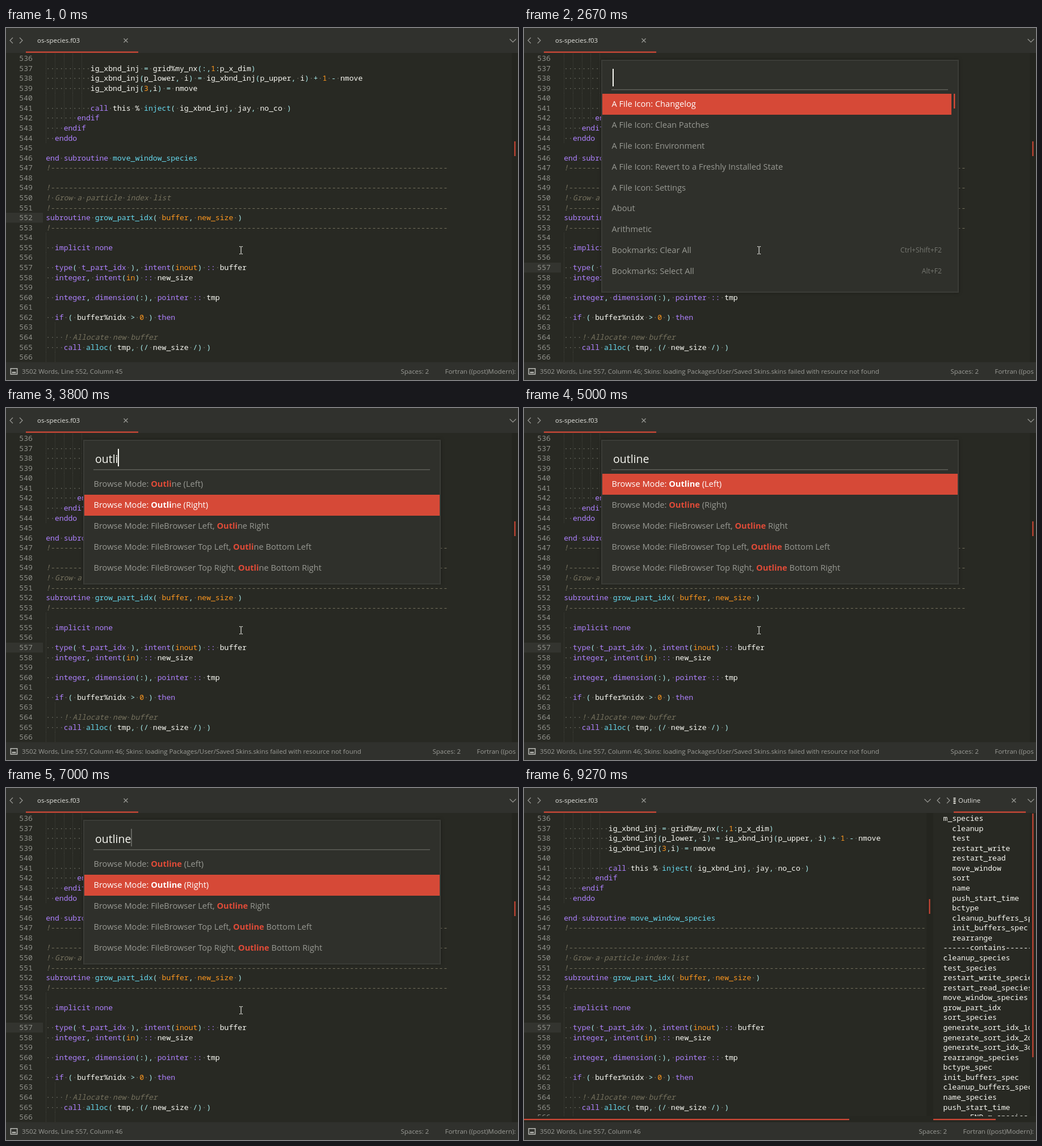
An HTML page with a canvas that plays this animation: 902 px wide and 621 px high, repeating every 9.39 s.

```html
<!DOCTYPE html>
<html lang="en">
<head>
<meta charset="utf-8">
<title>Outline command</title>
<style>
html, body { margin: 0; width: 100%; height: 100%; overflow: hidden; background: #282923; }
canvas { display: block; }
</style>
</head>
<body>
<canvas id="stage" width="902" height="621"></canvas>
<script>
const g = document.getElementById('stage').getContext('2d');
const LOOP = 9390, ADV = 7.86, CODE_X = 70.2, RED = '#d64937';
const MONO = '13.1px "Noto Sans Mono", "DejaVu Sans Mono", monospace';
const UI = '"Open Sans", "Noto Sans", sans-serif';
const SMALL = '11.45px ' + UI, ITEM = '14.6px ' + UI, QUERY = '19.5px ' + UI, HINT = '12.2px ' + UI;
const PURPLE = '#ae81ff', CYAN = '#66d9ef', ORANGE = '#fd971f', WHITE = '#f8f8f2', PUNCT = '#a6e8e8', COMMENT = '#75715e';

const RULE = '!' + '-'.repeat(89);
const CODE = `
          ig_xbnd_inj = grid%my_nx(:,1:p_x_dim)
          ig_xbnd_inj(p_lower, i) = ig_xbnd_inj(p_upper, i) + 1 - nmove
          ig_xbnd_inj(3,i) = nmove

          call this % inject( ig_xbnd_inj, jay, no_co )
       endif
    endif
  enddo

end subroutine move_window_species
${RULE}

${RULE}
! Grow a particle index list
${RULE}
subroutine grow_part_idx( buffer, new_size )
${RULE}

  implicit none

  type( t_part_idx ), intent(inout) :: buffer
  integer, intent(in) :: new_size

  integer, dimension(:), pointer :: tmp

  if ( buffer%nidx > 0 ) then

    ! Allocate new buffer
    call alloc( tmp, (/ new_size /) )
`.split('\n');
const KEYWORD = /^(call|endif|enddo|end|subroutine|implicit|none|type|t_part_idx|integer|intent|dimension|pointer|if|then|::)$/;
const FUNC = /^(inject|alloc|move_window_species|grow_part_idx)$/;

const OUTLINE = ['m_species',
  ...'cleanup test restart_write restart_read move_window sort name push_start_time bctype cleanup_buffers_spec init_buffers_spec rearrange'.split(' ').map(s => '  ' + s),
  '------contains------',
  ...'cleanup_species test_species restart_write_species restart_read_species move_window_species grow_part_idx sort_species generate_sort_idx_1d generate_sort_idx_2d generate_sort_idx_3d rearrange_species bctype_spec init_buffers_spec cleanup_buffers_spec name_species push_start_time'.split(' '),
  '------END m_species------'];

const ICONS = ['Changelog', 'Clean Patches', 'Environment', 'Revert to a Freshly Installed State', 'Settings'].map(s => 'A File Icon: ' + s);
const MARKS = ['Bookmarks: Clear All', 'Bookmarks: Select All'];
const BROWSE = ['Outline (Left)', 'Outline (Right)', 'FileBrowser Left, Outline Right',
  'FileBrowser Top Left, Outline Bottom Left', 'FileBrowser Top Right, Outline Bottom Right'].map(s => 'Browse Mode: ' + s);
const UNFOLD = 'Code Folding: Unfold All', LEVEL = 'Code Folding: Unfold To Level', UPPER = 'Convert Case: Upper Case';
const KEYS = { [MARKS[0]]: 'Ctrl+Shift+F2', [MARKS[1]]: 'Alt+F2', [UNFOLD]: 'Ctrl+K, Ctrl+J', [UPPER]: 'Ctrl+K, Ctrl+U' };

// start time, query, rows, selected row, scroll thumb length
const STATES = [
  [1330, '', [...ICONS, 'About', 'Arithmetic', ...MARKS], 0, 26],
  [2730, 'o', ['About', ...MARKS, ...BROWSE, UNFOLD], 4, 30],
  [3000, 'ou', [...BROWSE, UNFOLD, UPPER, 'File: Copy URL', 'Package Control: Upgrade Package'], 1, 95],
  [3270, 'out', [...BROWSE, LEVEL, 'Convert Case: Underscore to Title', 'Project: Quick Switch Project', 'Code Folding: Unfold Tags'], 1, 250],
  [3600, 'outl', [...BROWSE, LEVEL], 1, 0],
  [3800, 'outli', BROWSE, 1, 0],
  [4000, 'outlin', BROWSE, 0, 0],
  [4330, 'outline', BROWSE, 0, 0],
  [5870, 'outline', BROWSE, 1, 0]
];
const PALETTE_START = 1330, PALETTE_END = 7070;

// caret fades: start, target opacity, duration
const FADES = [[0, 0, 0], [330, 1, 1], [730, 0, 340], [1330, 1, 1], [1530, 0, 340], [2270, 1, 300], [4670, 0, 330],
  [5270, 1, 270], [5730, 0, 270], [6330, 1, 270], [6800, 0, 270], [7330, 1, 270], [8070, 0, 270], [8470, 1, 270], [9040, 0, 230]];

const last = (list, t) => list.filter(e => e[0] <= t).pop();

function caretAlpha(t) {
  const [start, to, span] = last(FADES, t);
  const k = span ? Math.min(1, (t - start) / span) : 1;
  return to ? k : 1 - k;
}

function rect(x, y, w, h, color) {
  g.fillStyle = color;
  g.fillRect(x, y, w, h);
}

function caret(t, x, y, h) {
  g.globalAlpha = caretAlpha(t);
  rect(x, y, 2, h, WHITE);
  g.globalAlpha = 1;
}

function text(s, x, y, font, color, align = 'left') {
  g.font = font;
  g.fillStyle = color;
  g.textAlign = align;
  g.fillText(s, x, y);
  return g.measureText(s).width;
}

function line(...points) {
  g.strokeStyle = '#9a9b96';
  g.lineWidth = 1.2;
  g.beginPath();
  for (const [x, y] of points) g.lineTo(x, y);
  g.stroke();
}

function clip(x, y, w, h, draw) {
  g.save();
  g.beginPath();
  g.rect(x, y, w, h);
  g.clip();
  draw();
  g.restore();
}

const baseline = i => Math.round(58 + 17.57 * i);

// blank lines keep the guides of the block around them
const blankDepth = i => i < 5 ? 10 : i > 26 ? 4 : i > 17 ? 2 : 0;

function codeLine(s, i) {
  const y = baseline(i), comment = s.trim()[0] === '!', indent = s.search(/\S/);
  const depth = indent < 0 ? blankDepth(i) : indent;
  for (let c = 0; c < depth; c += 2)
    for (let d = 0; d < 17; d += 2) rect(Math.round(CODE_X + c * ADV), y - 13 + d, 1, 1, '#41423b');
  let inArgs = false;
  for (const m of s.matchAll(comment ? /\s|\S+/g : /\w+|::|\s|[^\w\s]/g)) {
    const w = m[0], x = CODE_X + m.index * ADV;
    if (w === ' ') {
      rect(x + 3.2, y - 5, 1.5, 1.5, '#6c6d62');
      continue;
    }
    if (w === '(' && s.startsWith('subroutine')) inArgs = true;
    const color = comment ? COMMENT : KEYWORD.test(w) ? PURPLE : FUNC.test(w) ? CYAN
      : /^(\d+|in|inout)$/.test(w) || inArgs && /\w/.test(w) ? ORANGE : /\w|%/.test(w) ? WHITE : PUNCT;
    text(w, x, y, (comment ? 'italic ' : '') + MONO, color);
  }
}

function editor(t, split) {
  const right = split ? 709 : 891, bottom = split ? 579 : 589;
  const [active, column] = t < 330 ? [16, 44] : [21, 45];
  clip(0, 44, right, bottom - 44, () => {
    rect(0, baseline(active) - 13, 65, 17.5, '#33342f');
    CODE.forEach((s, i) => {
      text(536 + i, 23.3, baseline(i), MONO, '#8f908a');
      codeLine(s, i);
    });
  });
  if (t < PALETTE_START || split) caret(t, CODE_X + column * ADV - .4, baseline(active) - 14, 18);
  rect(right, 44, 12, 546, '#24251f');
  rect(right + 4.5, split ? 196 : 200, 2, 26, RED);
}

const dropArrow = x => line([x - 5.5, 19.5], [x, 25], [x + 5.5, 19.5]);

function tabBar(x, label, labelX, closeX, from, to) {
  line([x + 12, 17], [x + 7, 22], [x + 12, 27]);
  line([x + 24, 17], [x + 29, 22], [x + 24, 27]);
  text(label, labelX, 26, SMALL, '#e4e4df');
  line([closeX - 3.5, 18.5], [closeX + 3.5, 25.5]);
  line([closeX + 3.5, 18.5], [closeX - 3.5, 25.5]);
  rect(from, 41.5, to - from, 2.2, RED);
}

function outlinePane() {
  rect(721, 44, 181, 546, '#282923');
  clip(721, 44, 170, 535, () => OUTLINE.forEach((s, i) => text(s.trim(), 738.6 + s.search(/\S/) * ADV, baseline(i) - .5, MONO, WHITE)));
  rect(891, 44, 11, 546, '#24251f');
  rect(0, 579, 902, 11, '#262721');
  rect(895.5, 45, 2, 430, RED);
  rect(0, 583.7, 573, 2.2, RED);
  rect(721, 583.7, 110, 2.2, RED);
  dropArrow(711);
  tabBar(721, 'Outline', 765, 863, 757, 884);
  for (let y = 17; y < 28; y += 3) rect(756.5, y, 4, 2, '#d8d8d2');
}

function statusBar(t) {
  const message = t >= PALETTE_START && t < 5270, shift = message ? 56 : 0, color = '#9b9c97';
  rect(0, 589.5, 902, 31.5, '#30312d');
  g.strokeStyle = '#b4b5b0';
  g.lineWidth = 1.6;
  g.strokeRect(8.3, 600.8, 11.4, 10);
  rect(10.5, 606.5, 7, 2.5, '#b4b5b0');
  const place = t < 330 ? 'Line 552, Column 45' : 'Line 557, Column 46';
  text('3502 Words, ' + place + (message ? '; Skins: loading Packages/User/Saved Skins.skins failed with resource not found' : ''), 28, 610, SMALL, color);
  text('Spaces: 2', 695.5 + shift, 609.5, SMALL, color);
  clip(0, 590, 898, 31, () => text('Fortran ((post)Modern): Fortran', 773.5 + shift, 609.5, SMALL, color));
}

// indices of matched letters: a run if there is one, else in order
function matches(label, query) {
  const s = label.toLowerCase(), run = s.indexOf(query);
  let at = -1;
  return [...query].map((c, i) => run >= 0 ? run + i : (at = s.indexOf(c, at + 1)));
}

function paletteRow(label, i, query, selected, rowWidth) {
  const top = Math.round(116 + 36.88 * i), y = top + 23, hits = matches(label, query);
  if (selected) rect(138, top, rowWidth, 37, RED);
  let x = 154.5, start = 0;
  for (let end = 1; end <= label.length; end++) {
    const hit = hits.includes(start);
    if (end < label.length && hits.includes(end) === hit) continue;
    x += text(label.slice(start, end), x, y, (hit ? 'bold ' : '') + ITEM, selected ? '#fff' : hit ? '#e04b38' : '#989993');
    start = end;
  }
  if (KEYS[label]) text(KEYS[label], 736, y - 1, HINT, '#767771', 'right');
}

function palette(t) {
  const [, query, rows, selected, thumb] = last(STATES, t);
  const height = thumb ? 410 : 70 + rows.length * 36.88;
  g.save();
  g.shadowColor = 'rgba(0,0,0,.35)';
  g.shadowBlur = 6;
  rect(136, 56, 630, height + 1, '#3b3c37');
  g.restore();
  rect(138, 58, 626, height - 3, '#2f302b');
  rect(154, 108, 593, 1.5, '#5d5e58');
  const w = text(query, 157, 96.5, QUERY, WHITE);
  caret(t, Math.round(156.2 + w), 72, 31);
  rows.forEach((label, i) => paletteRow(label, i, query, i === selected, thumb ? 615 : 626));
  if (thumb) rect(757, 116, 2.4, thumb, RED);
}

function pointer(t) {
  if (t > 8600) return;
  const k = Math.max(0, Math.min(1, (t - 8070) / 500)) ** 2;
  const x = Math.round(414 - 268 * k), y = Math.round(392 + 215 * k);
  rect(x - .6, y - 6, 1.3, 12, '#d5d5d0');
  for (const end of [-7, 6]) {
    rect(x - 3, y + end, 2.5, 1.2, '#d5d5d0');
    rect(x + .6, y + end, 2.5, 1.2, '#d5d5d0');
  }
}

function draw(t) {
  const split = t >= PALETTE_END;
  rect(0, 0, 902, 621, '#282923');
  rect(0, 0, 902, 44, '#30312d');
  tabBar(0, 'os-species.f03', 55, 211, 35, 233);
  editor(t, split);
  if (split) outlinePane();
  clip(0, 0, 899, 44, () => dropArrow(893));
  statusBar(t);
  if (t >= PALETTE_START && !split) palette(t);
  pointer(t);
}

const begin = performance.now();
function tick() {
  draw((performance.now() - begin) % LOOP);
  requestAnimationFrame(tick);
}
tick();
</script>
</body>
</html>
```
